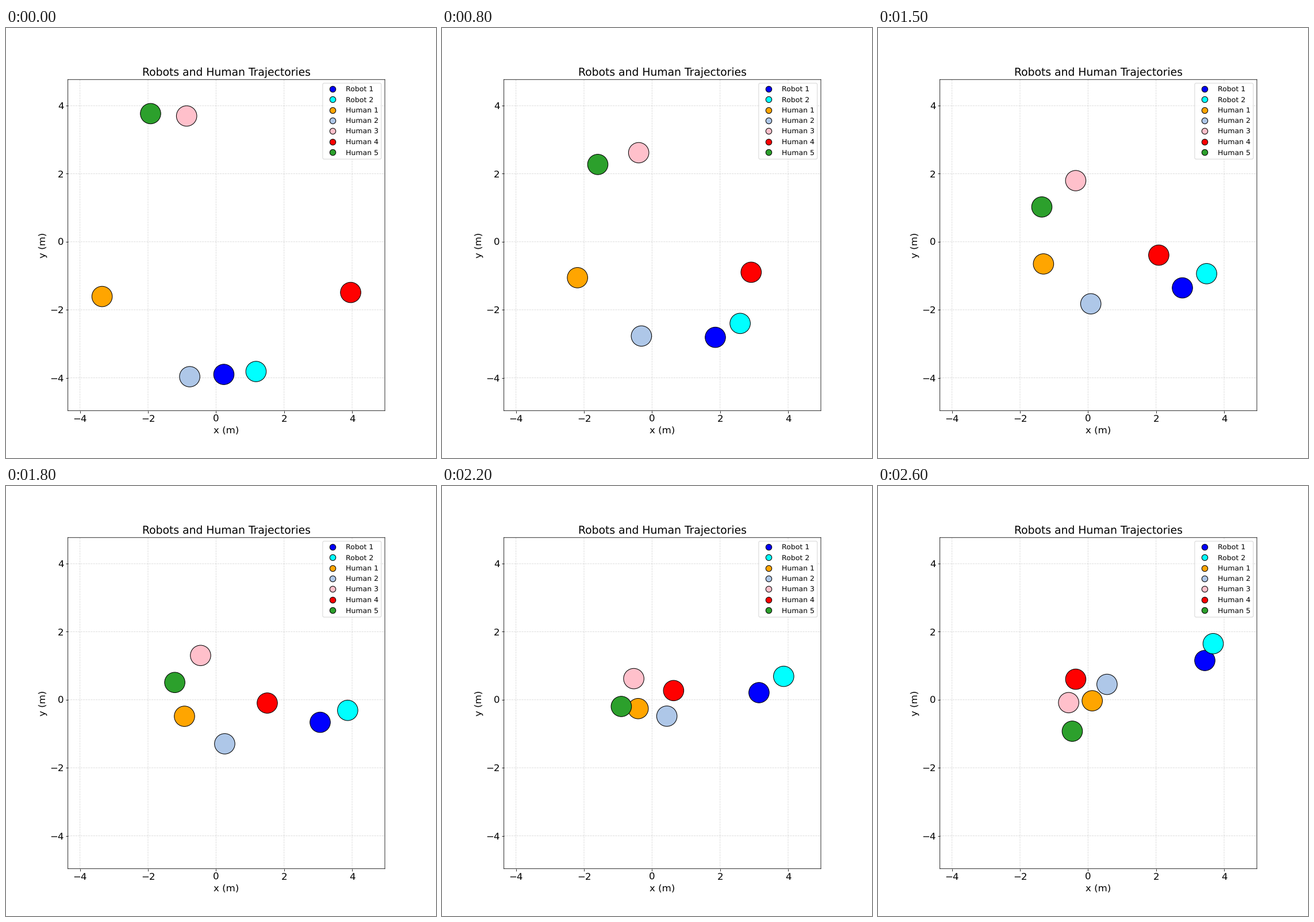
Recreate the animation shown at these times as a matplotlib script. Size 748 by 748 pixels, loop 2.7 s.

```python
import numpy as np
import matplotlib.pyplot as plt
from matplotlib.animation import FuncAnimation
from matplotlib.lines import Line2D
from matplotlib.patches import Circle

FRAMES, INTERVAL = 27, 100
TURN, VIA, LAST = 12, 18, FRAMES - 1  # frames of the humans' key points
RADIUS = 0.3  # m

plt.rcParams.update({
    "font.family": "DejaVu Sans",
    "text.hinting": "none",
    "path.snap": False,
})


# Positions are complex numbers: x + y*1j, in metres.
def robot_path(start, *runs):
    """Straight runs, each (steps, heading in degrees, metres per step)."""
    moves = [np.full(n, stride * np.exp(1j * np.radians(heading)))
             for n, heading, stride in runs]
    return start + np.cumsum(np.concatenate([[0], *moves]))


def human_path(start, turn, via, end, brake):
    """Brake on the way to the turn, then follow a parabola to the end."""
    u = np.arange(TURN) / TURN
    approach = start + (turn - start) * (u + brake * u * (1 - u))
    curve = np.polyfit([0, VIA - TURN, LAST - TURN], [turn, via, end], 2)
    return np.concatenate([approach,
                           np.polyval(curve, np.arange(FRAMES - TURN))])


agents = [
    ("Robot 1", "blue", robot_path(
        0.23 - 3.9j, (4, 22.5, 0.25), (7, 45, 0.25), (7, 67.5, 0.25),
        (4, 84.5, 0.219), (4, 73, 0.247))),
    ("Robot 2", "cyan", robot_path(
        1.176 - 3.815j, (8, 45, 0.25), (10, 58.5, 0.245),
        (4, 90, 0.25), (4, 101.25, 0.245))),
    ("Human 1", "orange", human_path(
        -3.35 - 1.61j, -1.685 - 0.815j, -0.928 - 0.486j, 0.123 - 0.03j, 0.13)),
    ("Human 2", "#aec7e8", human_path(
        -0.774 - 3.967j, -0.125 - 2.286j, 0.255 - 1.295j, 0.558 + 0.452j, 0.2)),
    ("Human 3", "pink", human_path(
        -0.865 + 3.697j, -0.243 + 2.277j, -0.455 + 1.302j, -0.57 - 0.085j, 0.42)),
    ("Human 4", "red", human_path(
        3.958 - 1.491j, 2.584 - 0.709j, 1.506 - 0.097j, -0.362 + 0.604j, 0.42)),
    ("Human 5", "#2ca02c", human_path(
        -1.925 + 3.767j, -1.43 + 1.525j, -1.213 + 0.508j, -0.463 - 0.925j, 0)),
]

fig, ax = plt.subplots(figsize=(10, 10), dpi=74.8)
ax.set_aspect("equal")
ax.set_xlim(-4.355, 4.963)
ax.set_ylim(-4.967, 4.767)
ax.set_xticks(range(-4, 5, 2))
ax.set_yticks(range(-4, 5, 2))
ax.tick_params(labelsize=16)
ax.set_xlabel("x (m)", fontsize=16)
ax.set_ylabel("y (m)", fontsize=16)
ax.set_title("Robots and Human Trajectories", fontsize=18)
ax.grid(True, linestyle="--", alpha=0.5)
ax.set_axisbelow(True)

discs = [ax.add_patch(Circle((path[0].real, path[0].imag), RADIUS,
                             facecolor=color, edgecolor="black",
                             linewidth=1, zorder=3))
         for _, color, path in agents]

handles = [Line2D([], [], linestyle="none", marker="o", markersize=10,
                  markerfacecolor=color, markeredgecolor="black", label=name)
           for name, color, _ in agents]
ax.legend(handles=handles, loc="upper right", fontsize=12, labelspacing=0.545)


def update(frame):
    for disc, (_, _, path) in zip(discs, agents):
        disc.center = path[frame].real, path[frame].imag
    return discs


anim = FuncAnimation(fig, update, frames=FRAMES, interval=INTERVAL,
                     repeat=True, repeat_delay=0, blit=False)
plt.show()
```
